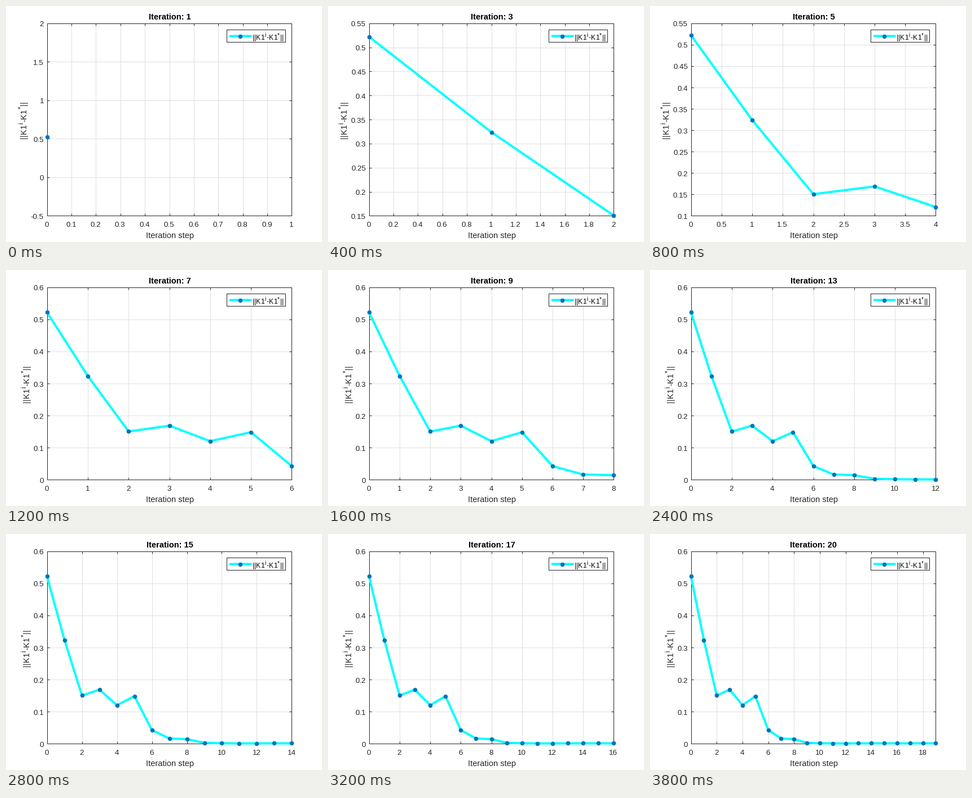
Write a matplotlib script that moves like this. It is 560x420 px and loops after 4000 ms.

```python
import math

import matplotlib.pyplot as plt
from matplotlib.animation import FuncAnimation
from matplotlib.patches import Rectangle

W, H, DPI = 560, 420, 100
PX = 72 / DPI                                  # points per pixel
LEFT, RIGHT, TOP, BOTTOM = 72.6, 506.45, 30.8, 373.4
TICK = 4
INK, GRID, CYAN, BLUE = "#262626", "#dfdfdf", "#00ffff", "#0072bd"

ERRORS = [0.5222, 0.3238, 0.1506, 0.1687, 0.1205, 0.1484, 0.0428,
          0.0165, 0.0145, 0.0031, 0.0019] + [0.0013] * 2 + [0.0016] * 7
STEPS = (0.01, 0.02, 0.05, 0.1, 0.2, 0.5, 1, 2)

# Advance widths in em; digits use the default
ADVANCE = {"|": 0.26, "K": 0.667, "i": 0.222, "-": 0.333, "*": 0.389, ".": 0.278}
NORM = (("||K1", 0), ("i", 1), ("-K1", 0), ("*", 1), ("||", 0))

plt.rcParams["font.family"] = "Liberation Sans"
fig = plt.figure(figsize=(W / DPI, H / DPI), dpi=DPI, facecolor="white")
ax = fig.add_axes([0, 0, 1, 1])


def advance(char):
    return ADVANCE.get(char, 0.556)


def line(xs, ys, color=INK, width=1, **kw):
    ax.plot(xs, ys, color=color, lw=width * PX, snap=False,
            solid_capstyle="butt", solid_joinstyle="round", **kw)


def curve(xs, ys, marks, **kw):
    line(xs, ys, CYAN, 4, **kw)
    ax.plot(*marks, "o", color=BLUE, ms=7.6 * PX, mew=0, snap=False, **kw)


def text(x, y, s, size, color=INK, **kw):
    kw = {"ha": "center", "va": "baseline", **kw}
    ax.text(x, y, s, fontsize=size * PX, color=color, **kw)


def norm_text(x, y, size, color, angle=0):
    """Draw ||K1^i-K1^*|| glyph by glyph, along x or (angle 90) upwards."""
    pos = 0
    for chars, raised in NORM:
        em = size * (0.8 if raised else 1)
        lift = round(0.44 * size) * raised
        for c in chars:
            at = (x - lift, y - pos) if angle else (x + pos, y - lift)
            text(*at, c, em, color, ha="left", rotation=angle,
                 rotation_mode="anchor", zorder=6)
            width = advance(c) * em
            pos += math.ceil(width) + 1 if raised else round(width)


def ticks(lo, hi):
    step = next(s for s in STEPS if (hi - lo) / s <= 11.001)
    count = math.floor((hi - lo) / step + 1e-6)
    return [round(lo + k * step, 4) for k in range(count + 1)]


def y_limits(n):
    if n == 1:
        return -0.5, 2
    if n == 2:
        return 0.32, 0.54
    if n <= 4:
        return 0.15, 0.55
    return (0.1, 0.55) if n <= 6 else (0, 0.6)


def pixel(v):
    """Centre of the pixel whose index is nearest to v."""
    return math.floor(v + 0.5) + 0.5


def draw(i):
    n = i + 1
    x_hi = max(1, i)
    y_lo, y_hi = y_limits(n)

    def to_x(v):
        return LEFT + (RIGHT - LEFT) * v / x_hi

    def to_y(v):
        return BOTTOM - (BOTTOM - TOP) * (v - y_lo) / (y_hi - y_lo)

    ax.clear()
    ax.set(xlim=(0, W), ylim=(H, 0))
    ax.axis("off")

    x0, x1, y0, y1 = map(pixel, (LEFT, RIGHT, TOP, BOTTOM))
    x_ticks, y_ticks = ticks(0, x_hi), ticks(y_lo, y_hi)
    for v in x_ticks:
        line([pixel(to_x(v))] * 2, [y0, y1], GRID)
    for v in y_ticks:
        line([x0, x1], [pixel(to_y(v))] * 2, GRID)
    ax.add_patch(Rectangle((x0, y0), x1 - x0, y1 - y0, fill=False, ec=INK,
                           lw=PX, snap=False, zorder=2))

    for v in x_ticks:
        x = pixel(to_x(v))
        line([x, x], [y1, y1 - TICK])
        line([x, x], [y0, y0 + TICK])
        text(to_x(v) - 0.5, 393, f"{v:g}", 13.33)
    for v in y_ticks:
        y = pixel(to_y(v))
        line([x0, x0 + TICK], [y, y])
        line([x1, x1 - TICK], [y, y])
        text(67, round(to_y(v) + 0.5) + 5, f"{v:g}", 13.33, ha="right")

    text(290, 24, f"Iteration: {n}", 14.67, "black", weight="bold")
    text(290, 413, "Iteration step", 14.67)
    widest = max(sum(map(advance, f"{v:g}")) for v in y_ticks)
    norm_text(int(59.6 - 13.33 * widest), 236, 14.67, INK, angle=90)

    xs = [to_x(k) for k in range(n)]
    ys = [to_y(v) for v in ERRORS[:n]]
    curve(xs, ys, (xs, ys))

    ax.add_patch(Rectangle((391.5, 42.5), 104, 22, fc="white", ec=INK,
                           lw=PX, snap=False, zorder=4))
    curve([396, 435.5], [53.5, 53.5], ([415], [53.5]), zorder=5)
    norm_text(437, 60, 12, "black")
    return []


anim = FuncAnimation(fig, draw, frames=20, interval=200, repeat=True,
                     repeat_delay=0)
plt.show()
```
